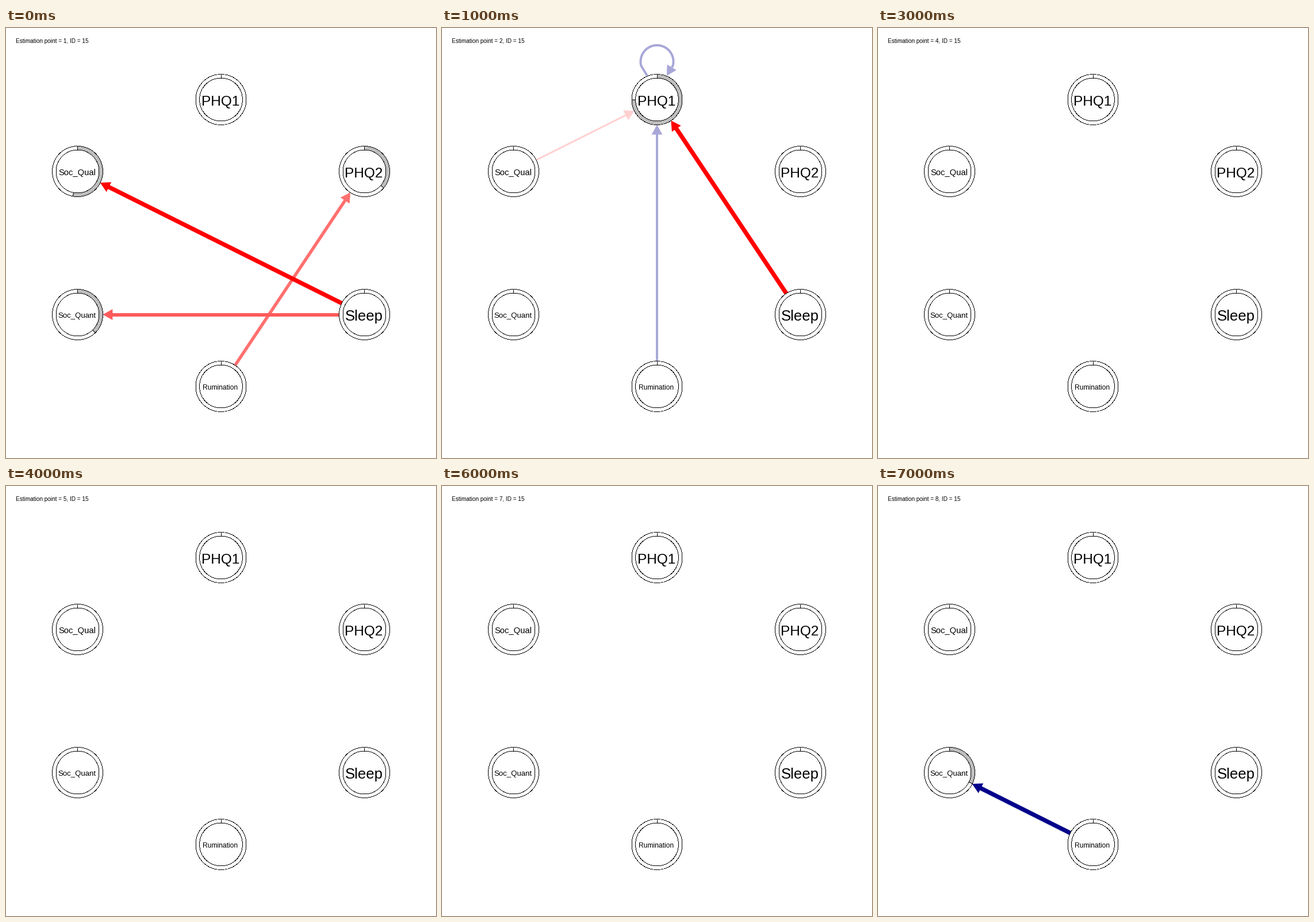
Animation, 748 px wide and 748 px high, one loop 8 s. Source, as a matplotlib script:

```python
import numpy as np
import matplotlib.pyplot as plt
from matplotlib.animation import FuncAnimation
from matplotlib.patches import Circle, Polygon, Wedge

SIZE, DPI = 748, 100
PT = 72 / DPI  # points per pixel
R_OUT, R_IN, OUTLINE = 43.9, 37.4, .95
HEAD_LEN, HEAD_HALF = 17, 9.5
RED, NAVY, GREY = "#FF0000", "#00008B", "#BEBEBE"

# name: (x, y, font size in px, baseline)
NODES = {
    "PHQ1": (374, 124.5, 24.5, 135),
    "PHQ2": (623.5, 249.5, 24.5, 260),
    "Sleep": (623.5, 498.5, 25.8, 509),
    "Rumination": (374, 623.5, 12.1, 629),
    "Soc_Quant": (124.5, 498.5, 13.3, 504),
    "Soc_Qual": (124.5, 249.5, 14.7, 256),
}

# Per estimation point: edges (from, to, colour, width) and filled ring shares
NETWORKS = {
    1: ([("Rumination", "PHQ2", "#FF7070", 5.5),
         ("Sleep", "Soc_Quant", "#FF5A5A", 6),
         ("Sleep", "Soc_Qual", RED, 7.5)],
        {"Soc_Qual": .53, "PHQ2": .363, "Soc_Quant": .377}),
    2: ([("Soc_Qual", "PHQ1", "#FFD0D0", 3),
         ("Rumination", "PHQ1", "#A8A8D8", 4),
         ("PHQ1", "PHQ1", "#A8A8D8", 4),
         ("Sleep", "PHQ1", RED, 7.5)],
        {"PHQ1": .748}),
    3: ([("Soc_Qual", "Soc_Qual", "#FFA3A3", 4),
         ("PHQ2", "Soc_Quant", "#7474C0", 5),
         ("Sleep", "Soc_Quant", "#6E6EBE", 5.5),
         ("Soc_Quant", "Soc_Quant", "#4E4EB0", 6),
         ("PHQ1", "Soc_Quant", RED, 7.5),
         ("Soc_Qual", "Soc_Quant", NAVY, 7.5)],
        {"Soc_Qual": .513, "Soc_Quant": .683}),
    8: ([("Rumination", "Soc_Quant", NAVY, 7.5)], {"Soc_Quant": .322}),
}

fig = plt.figure(figsize=(SIZE / DPI, SIZE / DPI), dpi=DPI, facecolor="white")
ax = fig.add_axes([0, 0, 1, 1])


def center(name):
    return np.array(NODES[name][:2])


def unit(v):
    return v / np.hypot(*v)


def line(points, color, width, z):
    x, y = np.transpose(points)
    ax.plot(x, y, color=color, lw=width * PT, zorder=z,
            solid_capstyle="butt", solid_joinstyle="round")


def head(tip, way, color, z):
    back = tip - HEAD_LEN * way
    side = HEAD_HALF * np.array([-way[1], way[0]])
    ax.add_patch(Polygon([tip, back + side, back - side], fc=color, lw=0,
                         zorder=z))
    return back


def arrow(src, dst, color, width, z):
    a, b = center(src), center(dst)
    way = unit(b - a)
    back = head(b - R_OUT * way, way, color, z)
    line([a + (R_OUT - 2) * way, back + way], color, width, z)


def loop(name, color, width, z):
    """Clockwise self-loop pointing away from the middle of the stage."""
    c = center(name)
    out = unit(c - SIZE / 2)
    side = np.array([-out[1], out[0]])

    def place(s, d):
        return c + s * side + d * out

    t = np.radians(np.linspace(195, -15, 60))
    arc = [place(28.5 * np.cos(k), 66 + 28.5 * np.sin(k)) for k in t]
    back = head(place(17, 41.5), unit(-8 * side - 13.5 * out), color, z)
    line([place(-17, 41.5), *arc, back], color, width, z)


def ring_tick(c, share):
    a = 2 * np.pi * share
    way = np.array([np.sin(a), -np.cos(a)])
    line([c + R_IN * way, c + R_OUT * way], "black", 1, 22)


def fill(patch, color):
    patch.set(fc=color, lw=0, zorder=21, antialiased=False)
    ax.add_patch(patch)


def disc(c, r):
    """White disc with a crisp one-pixel outline."""
    fill(Circle(c, r), "black")
    fill(Circle(c, r - OUTLINE), "white")


def node(name, share):
    x, _, size, base = NODES[name]
    c = center(name)
    disc(c, R_OUT)
    if share:
        fill(Wedge(c, R_OUT - OUTLINE, -90, -90 + 360 * share), GREY)
        ring_tick(c, share)
    disc(c, R_IN)
    ring_tick(c, 0)
    label(x - 1, base, name, size, "center")


def label(x, y, text, size, ha):
    ax.text(x, y, text, fontsize=size * PT, family="Liberation Sans",
            ha=ha, va="baseline", color="black", zorder=30)


def draw(i):
    ax.clear()
    ax.set(xlim=(0, SIZE), ylim=(SIZE, 0))
    ax.axis("off")
    point = i + 1
    edges, shares = NETWORKS.get(point, ([], {}))
    for z, (src, dst, color, width) in enumerate(edges, 1):
        if src == dst:
            loop(src, color, width, z)
        else:
            arrow(src, dst, color, width, z)
    for name in NODES:
        node(name, shares.get(name, 0))
    label(17.5, 26, f"Estimation point = {point}, ID = 15", 10, "left")
    return []


anim = FuncAnimation(fig, draw, frames=8, init_func=lambda: [],
                     interval=1000, repeat=True, repeat_delay=0)
plt.show()
```
